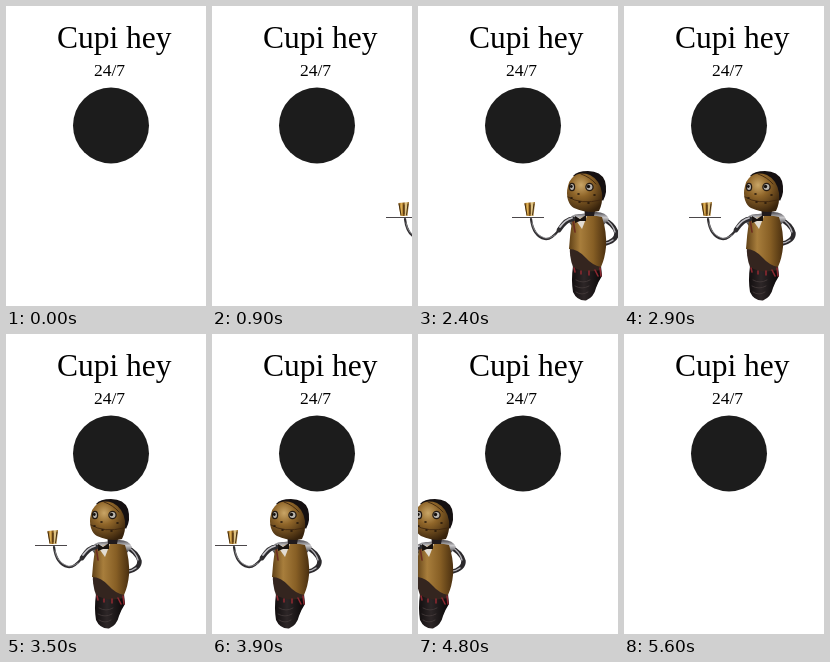
An HTML page for the animation above (6 s loop, 200 by 300 pixels).

```html
<!DOCTYPE html>
<html lang="en">
<head>
<meta charset="utf-8">
<title>Cupi hey</title>
<style>
  html, body { margin: 0; width: 100%; height: 100%; overflow: hidden; background: #fff; }
  svg { display: block; width: 200px; height: 300px; }
  text { font-family: "Liberation Serif", "Times New Roman", serif; text-anchor: middle; }
</style>
</head>
<body>
<svg viewBox="0 0 200 300">
  <defs>
    <radialGradient id="face" cx=".4" cy=".3" r=".75">
      <stop offset="0" stop-color="#c9a566"/>
      <stop offset=".4" stop-color="#8f6529"/>
      <stop offset="1" stop-color="#38230c"/>
    </radialGradient>
    <linearGradient id="body">
      <stop offset="0" stop-color="#5f4016"/>
      <stop offset=".3" stop-color="#a87e3c"/>
      <stop offset=".65" stop-color="#875f25"/>
      <stop offset="1" stop-color="#4a2f0f"/>
    </linearGradient>
    <linearGradient id="steel" x2="0" y2="1">
      <stop offset="0" stop-color="#47454a"/>
      <stop offset=".4" stop-color="#c9c8cb"/>
      <stop offset="1" stop-color="#252428"/>
    </linearGradient>
    <linearGradient id="cup">
      <stop offset="0" stop-color="#8a5a14"/>
      <stop offset=".3" stop-color="#e0b256"/>
      <stop offset=".5" stop-color="#7a4b0e"/>
      <stop offset=".7" stop-color="#f3dc9c"/>
      <stop offset="1" stop-color="#8a5a14"/>
    </linearGradient>
    <linearGradient id="wheel">
      <stop offset="0" stop-color="#120e0f"/>
      <stop offset=".4" stop-color="#2d2627"/>
      <stop offset="1" stop-color="#090708"/>
    </linearGradient>
  </defs>

  <text x="108.3" y="42" font-size="31.5">Cupi hey</text>
  <text x="103.5" y="70" font-size="17.5">24/7</text>
  <circle cx="105" cy="119.5" r="38" fill="#1c1c1c"/>

  <g id="waiter" fill="none" stroke-linecap="round" stroke-linejoin="round" visibility="hidden">
    <!-- wheel and waist -->
    <path fill="url(#wheel)" d="M89 260L117 260L118 270Q114 276 112 282Q110 291 102 294.5Q93 295 89 286Q87 274 89 260Z"/>
    <path stroke="#463b3c" stroke-width=".8" d="M92 274q7 4 14 0M91 280q7 4 14 0M92 286q6 4 12 0"/>
    <path fill="#34251f" d="M86 240Q98 242 117 259L117 264Q100 268 89 261Q85 250 86 240Z"/>
    <path stroke="#8c2830" stroke-width="1.6" d="M90 262l1 4M97 265v3M105 265v4M111 264l3 6M116 262l1 8"/>

    <!-- far arm -->
    <path stroke="#2b292c" stroke-width="4.5" d="M119 213Q130 218 132.5 227Q133 235 120 238"/>
    <path stroke="#b4b3b8" stroke-width="1.4" d="M121 213Q129 218 131 226M129 234Q125 237 121 237"/>

    <!-- torso -->
    <path fill="url(#steel)" d="M84 215Q87 207 97 208L112 206Q122 206 125 213L119 220L88 220Z"/>
    <path fill="url(#body)" d="M88 215Q102 207 118 211Q123 226 122 241Q121 252 117 261Q108 259 102 252Q94 243 85 243Q86 228 88 215Z"/>
    <path fill="#e2dcd2" d="M91 213L103 210L98 223Z"/>
    <path fill="#18120f" d="M91 210L96 213L102 209L102 215L96 215L91 217Z"/>
    <path stroke="#6d2c20" stroke-width="1.6" d="M89 213L91 226"/>

    <!-- serving arm -->
    <path stroke="#2c2b2e" stroke-width="4.8" d="M89 213Q82 213 75 224"/>
    <path stroke="#c4c3c8" stroke-width="1.8" d="M88 212Q81 214 76 221"/>
    <path stroke="#302e31" stroke-width="2.2" d="M75 224Q67 234 61 233Q49 230 47 213"/>
    <path stroke="#99999c" stroke-width=".8" d="M71 229Q65 233 61 232Q50 229 48 217"/>

    <!-- tray and cup -->
    <path stroke="#4b474a" stroke-linecap="butt" d="M28 211.5H60"/>
    <path fill="url(#cup)" d="M40.5 197L51 196L49.5 210H42.5Z"/>
    <path stroke="#382309" stroke-width=".9" d="M41 198L43 209M46 199V208M50 198L48.5 209"/>

    <!-- head -->
    <path fill="#201a1c" d="M100 200H112L110 210H101Z"/>
    <path fill="#151011" d="M89 170Q93 165 104 165Q117 165 121 175Q124 186 119 195L108 182Z"/>
    <path fill="url(#face)" d="M88 172Q95 165 106 169Q116 174 118 187Q119 197 115 205Q104 208 90 202Q86 200 84 194Q82 187 84 180Q85 175 88 172Z"/>
    <path stroke="#402810" stroke-width=".9" d="M84 191Q97 199 117 194M97 168Q106 171 112 178"/>
    <path stroke="#21140a" stroke-width="1.6" d="M87 192H88M95 196H96M94 188H95M104 197H105M110 189H111"/>
    <g fill="#b9b5af" stroke="#241a12" stroke-width="1.3">
      <ellipse cx="88" cy="181" rx="2.6" ry="3.6"/>
      <circle cx="105.5" cy="181" r="3.6"/>
    </g>
    <g fill="#15100d">
      <circle cx="87.3" cy="180.500" r="1.400"/>
      <circle cx="104.500" cy="180.500" r="1.700"/>
    </g>
  </g>
</svg>
<script>
  const LOOP = 6000, START = 400, END = 5600, STEP = 100;
  const REST = 28;
  const waiter = document.getElementById("waiter");

  // Glides left, gathering speed, in 100 ms steps.
  function trayLeft(n) {
    return Math.round(200.3 - 5.19 * n - 0.00036 * n ** 3);
  }

  function draw() {
    const t = performance.now() % LOOP;
    const moving = t >= START && t < END;
    waiter.setAttribute("visibility", moving ? "visible" : "hidden");
    if (moving) {
      const n = Math.floor((t - START) / STEP);
      waiter.setAttribute("transform", `translate(${trayLeft(n) - REST} 0)`);
    }
    requestAnimationFrame(draw);
  }
  draw();
</script>
</body>
</html>
```
